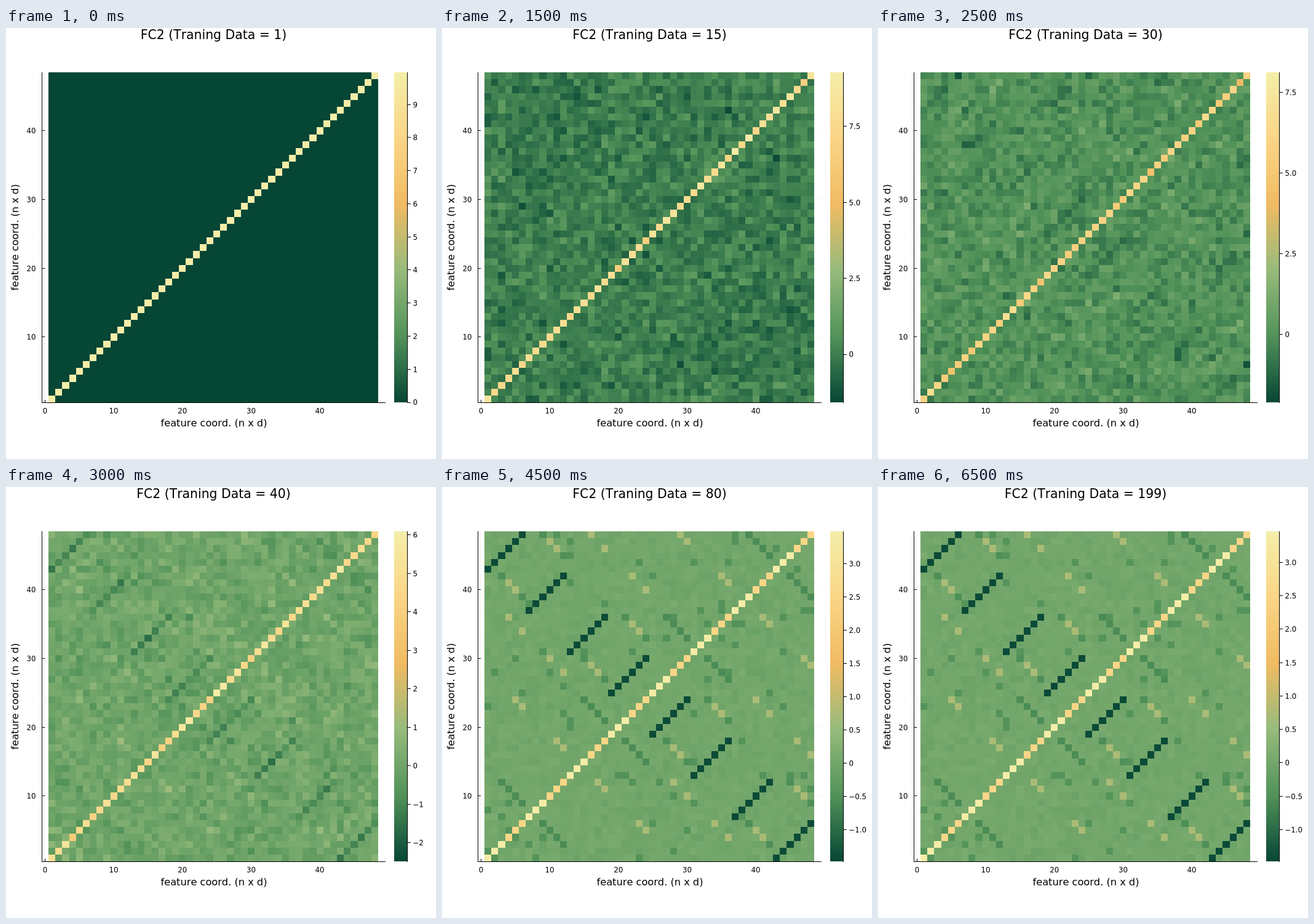
Recreate the animation shown at these times as an HTML page with a canvas. Size 699 by 700 pixels, loop 7000 ms.

```html
<!DOCTYPE html>
<html lang="en">
<head>
<meta charset="utf-8">
<title>Feature matrix</title>
<style>
  html, body { margin: 0; width: 100%; height: 100%; overflow: hidden; background: #fff; }
  canvas { display: block; }
</style>
</head>
<body>
<canvas id="plot" width="699" height="700"></canvas>
<script>
const ctx = document.getElementById('plot').getContext('2d');
const SIZE = 48, STEP_MS = 500, LEFT = 69, TOP = 72, BOTTOM = 608, SPAN = BOTTOM - TOP;
const CELL = SPAN / SIZE;
const STOPS = ['#064635', '#519259', '#96bb7c', '#f0bb62', '#fad586', '#f4eea9'];
const RGB = STOPS.map(c => [1, 3, 5].map(i => parseInt(c.slice(i, i + 2), 16)));
const COUNTS = [1, 5, 10, 15, 20, 30, 40, 50, 60, 80, 100, 120, 150, 199];
const SETTLED = 60;

// key points of the colour range: [count, low, high]
const RANGE = [[1, 0, 9.97], [5, -1.25, 10], [15, -1.58, 9.28], [30, -2.1, 8.12],
  [40, -2.48, 6.09], [60, -1.5, 3.55], [80, -1.48, 3.49], [199, -1.475, 3.465]];

const mix = (a, b, t) => a + (b - a) * t;
const clamp = (v, lo, hi) => Math.max(lo, Math.min(hi, v));
const edgeX = i => Math.round(LEFT + CELL * i);
const edgeY = i => Math.round(BOTTOM - CELL * i);
const px = v => LEFT + CELL * (v - 0.5);
const py = v => BOTTOM - CELL * (v - 0.5);

function rangeAt(count) {
  const i = Math.max(1, RANGE.findIndex(key => key[0] >= count));
  const [a, b] = [RANGE[i - 1], RANGE[i]];
  const t = (count - a[0]) / (b[0] - a[0]);
  return { lo: mix(a[1], b[1], t), hi: mix(a[2], b[2], t) };
}

function seeded(seed) {
  return () => {
    seed = (seed + 0x6d2b79f5) | 0;
    let t = Math.imul(seed ^ (seed >>> 15), 1 | seed);
    t = (t + Math.imul(t ^ (t >>> 7), 61 | t)) ^ t;
    return ((t ^ (t >>> 14)) >>> 0) / 4294967296;
  };
}
const normal = rand => (rand() + rand() + rand() + rand() - 2) * 1.73;

function symmetric(valueAt) {
  const m = Array.from({ length: SIZE + 1 }, () => []);
  for (let r = 1; r <= SIZE; r++)
    for (let c = 1; c <= r; c++) m[r][c] = m[c][r] = valueAt(r, c);
  return m;
}

function convergedMatrix() {
  const rand = seeded(7);
  const m = symmetric((r, c) => r === c
    ? ((r - 1) % 6 < 3 ? 3.42 : 2.52)
    : rand() < 0.03 ? -0.45 : 0.05 * normal(rand));
  const put = (c, r, value) => { m[r][c] = m[c][r] = value; };

  for (let block = 0; block < 4; block++) {
    for (let k = 1; k <= 6; k++) put(block * 6 + k, 42 - block * 6 + k, -1.42);
    for (let k = 0; k < 4; k++) put(block * 12 + 3 + k, block * 12 + 12 - k, -0.56);
  }
  // short anti-diagonals that repeat with the lattice period
  for (const j of [0, 1]) for (const k of [0, 1]) {
    for (let i = -1; i <= 2; i++)
      put(4 + 6 * j + 12 * k + i, 41 + 6 * j - 12 * k - i, i === 0 || i === 1 ? 0.72 : -0.52);
    for (const i of [0, 1]) {
      put(5 + 6 * j + 24 * k + i, 24 - 6 * j + 24 * k - i, 0.72);
      put(4 + 6 * j + 12 * k + 2 * i, 36 - 6 * j + 12 * k - 2 * i, 0.72);
    }
  }
  return m;
}
const converged = convergedMatrix();

// the estimate moves from a plain diagonal, through noise, to the converged matrix
function matrixFor(count, { lo, hi }) {
  if (count >= SETTLED) return converged;
  const p = (count - 1) / (SETTLED - 1);
  const rand = seeded(count * 101);
  const noise = 0.46 * Math.sin(Math.PI * p ** 0.6);
  const structure = p * p * (3 - 2 * p);
  const diagonal = p * (1.35 - 0.35 * p);
  return symmetric((r, c) => clamp(r === c
    ? mix(9.92, converged[r][c], diagonal) + 1.4 * noise * normal(rand)
    : structure * converged[r][c] + noise * normal(rand), lo, hi));
}

const steps = COUNTS.map(count => {
  const range = rangeAt(count), width = range.hi - range.lo;
  return {
    count, ...range,
    tick: width > 10 ? 2.5 : width > 5 ? 1 : 0.5,
    matrix: matrixFor(count, range)
  };
});

function colour(t) {
  const pos = clamp(t, 0, 1) * (RGB.length - 1);
  const i = Math.min(RGB.length - 2, Math.floor(pos));
  return `rgb(${RGB[i].map((v, k) => Math.round(mix(v, RGB[i + 1][k], pos - i)))})`;
}
function line(x1, y1, x2, y2, stroke = '#000') {
  ctx.strokeStyle = stroke;
  ctx.beginPath();
  ctx.moveTo(x1, y1);
  ctx.lineTo(x2, y2);
  ctx.stroke();
}
function text(str, x, y, size, align = 'center') {
  ctx.font = `${size}px "DejaVu Sans", sans-serif`;
  ctx.textAlign = align;
  ctx.fillStyle = '#000';
  ctx.fillText(str, x, y);
}

function drawAxes() {
  const faint = 'rgba(0,0,0,.04)';
  for (let v = 0; v <= 40; v += 10) {
    const x = Math.floor(px(v)) + 0.5, y = Math.floor(py(v)) + 0.5;
    line(x, TOP, x, BOTTOM, faint);
    line(x, BOTTOM, x, BOTTOM - 4);
    text(v, px(v), 625.7, 11.8);
    if (!v) continue;
    line(58, y, 617, y, faint);
    line(58, y, 63, y);
    text(v, 48.5, py(v) + 4.4, 11.8, 'right');
  }
  line(58.5, TOP, 58.5, 609);
  line(58, 608.5, 617, 608.5);
  text('feature coord. (n x d)', 338, 647, 16.2);
  ctx.save();
  ctx.translate(20, 340);
  ctx.rotate(-Math.PI / 2);
  text('feature coord. (n x d)', 0, 0, 16.2);
  ctx.restore();
}

function drawCells({ lo, hi, matrix }) {
  for (let r = 1; r <= SIZE; r++) {
    const y = edgeY(r), h = edgeY(r - 1) - y;
    for (let c = 1; c <= SIZE; c++) {
      const x = edgeX(c - 1);
      ctx.fillStyle = colour((matrix[r][c] - lo) / (hi - lo));
      ctx.fillRect(x, y, edgeX(c) - x, h);
    }
  }
}

function drawColourBar({ lo, hi, tick }) {
  const fill = ctx.createLinearGradient(0, BOTTOM, 0, TOP);
  STOPS.forEach((c, i) => fill.addColorStop(i / (STOPS.length - 1), c));
  ctx.fillStyle = fill;
  ctx.fillRect(631, TOP, 21, SPAN);
  line(652.5, TOP, 652.5, 609);
  for (let k = Math.ceil(lo / tick); k * tick <= hi; k++) {
    const v = k * tick;
    const y = BOTTOM - (v - lo) / (hi - lo) * SPAN;
    const label = k === 0 ? '0' : v.toFixed(tick === 1 ? 0 : 1).replace('-', '\u2212');
    line(652, Math.floor(y) + 0.5, 658, Math.floor(y) + 0.5);
    text(label, 661.4, y + 4.4, 11.8, 'left');
  }
}

function draw(step) {
  ctx.fillStyle = '#fff';
  ctx.fillRect(0, 0, 699, 700);
  ctx.lineWidth = 1;
  ctx.fontKerning = 'none';
  drawAxes();
  drawCells(step);
  drawColourBar(step);
  text(`FC2 (Traning Data = ${step.count})`, 337.5, 18, 20.4);
}

const start = performance.now();
let shown = -1;
function play() {
  const index = Math.floor((performance.now() - start) / STEP_MS) % steps.length;
  if (index !== shown) draw(steps[shown = index]);
  requestAnimationFrame(play);
}
play();
</script>
</body>
</html>
```
